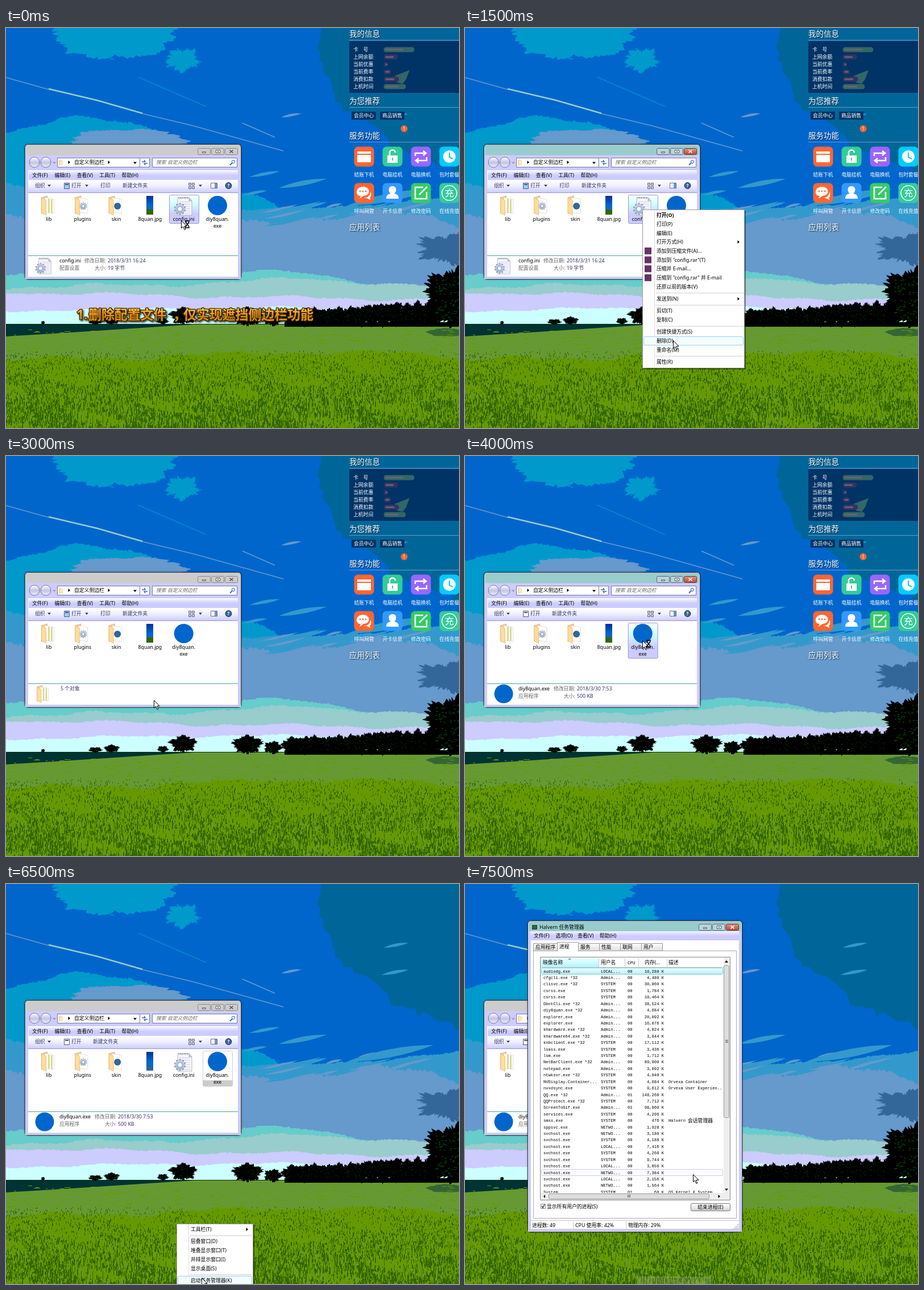
Recreate the animation shown at these times as an HTML page with a canvas. Size 797 by 703 pixels, loop 8 s.

```html
<!DOCTYPE html>
<html lang="zh">
<head>
<meta charset="utf-8">
<style>
html, body { margin: 0; width: 100%; height: 100%; overflow: hidden; }
canvas { display: block; }
</style>
</head>
<body>
<canvas id="stage" width="797" height="703"></canvas>
<script>
const W = 797, H = 703, LOOP = 8000, STEP = 500;
const UI = '"Noto Sans", "Noto Sans CJK SC", "Noto Sans CJK", sans-serif';
const MONO = '"Liberation Mono", "Noto Sans CJK SC", "Noto Sans CJK", monospace';
const screen = document.getElementById('stage').getContext('2d');
let c = screen;

let seed = 7;
const rnd = () => (seed = (seed * 16807) % 2147483647) / 2147483647;
const between = (a, b) => a + rnd() * (b - a);

// ---- drawing helpers ----
function rect(x, y, w, h, color) { c.fillStyle = color; c.fillRect(x, y, w, h); }
function box(x, y, w, h, fill, line, r = 0) {
  c.beginPath();
  c.roundRect(x + .5, y + .5, w - 1, h - 1, r);
  if (fill) { c.fillStyle = fill; c.fill(); }
  if (line) { c.strokeStyle = line; c.lineWidth = 1; c.stroke(); }
}
function fade(y0, y1, ...colors) {
  const g = c.createLinearGradient(0, y0, 0, y1);
  colors.forEach((col, i) => g.addColorStop(i / (colors.length - 1), col));
  return g;
}
function disc(x, y, r, fill, line) {
  c.beginPath();
  c.arc(x, y, r, 0, 7);
  if (fill) { c.fillStyle = fill; c.fill(); }
  if (line) { c.strokeStyle = line; c.lineWidth = 1; c.stroke(); }
}
function shape(d, fill, line, width = 1, x = 0, y = 0, s = 1) {
  const p = new Path2D(d);
  c.save();
  c.translate(x, y);
  c.scale(s, s);
  if (fill) { c.fillStyle = fill; c.fill(p); }
  if (line) { c.strokeStyle = line; c.lineWidth = width; c.stroke(p); }
  c.restore();
}
function text(s, x, y, color = '#000', size = 8.8, align = 'left', style = '', font = UI) {
  c.font = `${style} ${size}px ${font}`;
  c.textAlign = align;
  c.fillStyle = color;
  c.fillText(s, x, y + size * .36);
}
const center = (s, x, y, color, size, style) => text(s, x, y, color, size, 'center', style);
const down = (x, y, color = '#000') => shape('M-3-1.5H3L0 2Z', color, null, 1, x, y);
const right = (x, y, color = '#000') => shape('M-1.5-3V3L2 0Z', color, null, 1, x, y);

// ---- landscape ----
// Everything below a wavy edge through evenly spaced heights
function ridge(color, heights, wave) {
  const p = rnd() * 9, n = heights.length - 1;
  c.beginPath();
  c.moveTo(0, H);
  for (let x = 0; x <= W + 3; x += 3) {
    const u = Math.min(x / W * n, n - .001), i = u | 0;
    c.lineTo(x, heights[i] + (heights[i + 1] - heights[i]) * (u - i)
      + wave * (Math.sin(x / 47 + p) + .6 * Math.sin(x / 17 + 2 * p) + rnd() - .5));
  }
  c.lineTo(W, H);
  c.fillStyle = color;
  c.fill();
}
// Ellipse with a ragged outline
function puff(color, x, y, rx, ry, rag = .12) {
  const p = rnd() * 9;
  c.beginPath();
  for (let a = 0; a < 6.28; a += .04) {
    const r = 1 + rag * (Math.sin(a * 5 + p) * .5 + Math.sin(a * 13 + p) * .3 + rnd() - .5);
    c.lineTo(x + Math.cos(a) * rx * r, y + Math.sin(a) * ry * r);
  }
  c.fillStyle = color;
  c.fill();
}
function tree(x, ground, w, h) {
  puff('#000', x, ground - h * .54, w / 2, h * .46, .25);
  rect(x - 2, ground - h / 2, 4, h / 2, '#000');
  for (let i = 0; i < w / 2; i++)
    rect(x + between(-.38, .38) * w | 0, ground - h * between(.25, .85) | 0, 2, 1, '#003300');
}
function sky() {
  rect(0, 0, W, H, '#0066cc');
  puff('#006699', 800, 0, 245, 240, .06);
  puff('#0099cc', 190, 0, 112, 54);
  puff('#0099cc', 310, 56, 27, 19, .3);
  ridge('#0099cc', [182, 160, 164, 182, 285, 322, 316, 312, 300], 4);
  puff('#6699cc', 215, 198, 100, 20);
  ridge('#3399cc', [270, 320, 318, 297], 3);
  ridge('#6699cc', [328, 346, 358, 340, 320, 345], 6);
  for (let i = 0; i < 22; i++) {
    const x = between(415, 700), y = 335 - (x - 415) * .12 + between(-12, 22), len = between(25, 80);
    shape(`M0 0Q${len / 2} -9 ${len} ${-len * .22}Q${len / 2} 0 0 0Z`, i % 2 ? '#6699cc' : '#3399cc', null, 1, x, y);
  }
  [[428, 262, 54], [480, 281, 84], [416, 294, 44], [600, 312, 152], [660, 160, 48], [664, 112, 44], [484, 157, 36]]
    .forEach(([x, y, len]) => shape(`M0 0Q${len / 2} ${-len * .17 - 3} ${len} ${-len * .19}Q${len / 2} 0 0 0Z`,
      x < 490 && y < 200 ? '#6699cc' : '#3399cc', null, 1, x, y));
  puff('#336699', 780, 388, 52, 24, .3);
  ridge('#66cccc', [430, 428, 430, 470], 3);
  ridge('#99cccc', [455, 452, 440, 458], 3);
  ridge('#ccccff', [464, 470, 474, 478], 2.5);
  ridge('#ccffff', [497, 491, 496], 2);
  shape('M0 87L75 108M238 150L330 172L488 216M416 167L473 192', null, '#6699cc', 1.6);
  shape('M75 107L160 127L240 150', null, '#99cccc', 2.6);
  shape('M232 86L352 138M100 30L190 55', null, '#0099cc', 1.3);
}
function field() {
  rect(0, 521, W, H, '#669933');
  ridge('#669900', [584, 578, 568, 576], 4);
  shape('M0 520H345L100 536L0 542Z', '#003333');
  rect(0, 520, W, 1, '#003300');
  puff('#336633', 775, 535, 34, 7);
  for (let i = 0; i < 300; i++)
    rect(rnd() * W | 0, between(530, 575) | 0, between(3, 12) | 0, 1, '#669900');
  for (let i = 0; i < 9500; i++) {
    const q = Math.pow(rnd(), .7), x = rnd() * W | 0, y = 566 + q * 137 | 0;
    const clump = Math.sin(x / 70 + y / 13) + Math.sin(x / 31 - y / 9);
    if (clump > -1.1 || i % 3 == 0)
      rect(x, y, 1 + (rnd() < q * .4), between(2, 4 + q * 8) | 0, i % 9 ? '#336600' : '#669933');
  }
}
function trees() {
  [[157, 22, 9], [186, 25, 13], [276, 18, 11], [65, 6, 6], [312, 44, 29]].forEach(([x, w, h]) => tree(x, 521, w, h));
  tree(425, 524, 50, 32);
  tree(470, 524, 30, 22);
  for (let x = 504; x < 750; x += 20) tree(x, 525, between(30, 40), 25 + (x - 500) * .06 + rnd() * 6);
  rect(490, 517, W, 8, '#000');
  puff('#000', 800, 474, 62, 54, .25);
  for (let i = 0; i < 80; i++) rect(between(755, W) | 0, between(435, 515) | 0, 3, 2, '#003300');
}

// ---- side panel ----
const TILES = [
  ['#ff6633', '结账下机', '', 'M6 9H30V13H6ZM6 15H30V28H6Z'],
  ['#33cc99', '电脑挂机', 'M13 17V12A5 5 0 0 1 23 11', 'M9 16H27V29H9Z'],
  ['#9966ff', '电脑换机', 'M8 17V12H26M22 8L27 12L22 16M28 19V25H10M14 21L9 25L14 29', ''],
  ['#00ccff', '包时套餐', '', 'M18 7A11 11 0 1 0 18.1 7Z'],
  ['#ff6633', '呼叫网管', '', 'M16 7C2 7 2 24 12 23L10 28L17 23C30 23 30 7 16 7ZM29 16C32 21 30 25 28 26L29 30L23 27H18C25 26 29 22 29 16Z'],
  ['#3399ff', '开卡信息', '', 'M18 6C9 6 11 17 15 19C9 20 7 23 7 28H29C29 23 27 20 21 19C25 17 27 6 18 6Z'],
  ['#33cc66', '修改密码', 'M22 8H8V28H28V16M15 21L29 7', ''],
  ['#33cc99', '在线充值', 'M18 5A13 13 0 1 0 18.1 5Z', '']
];
function heading(s, y) {
  c.save();
  c.shadowColor = '#002244';
  c.shadowOffsetX = c.shadowOffsetY = 1;
  c.shadowBlur = 2;
  text(s, 604, y, '#fff', 13.5);
  c.restore();
  rect(604, y + 11, 193, 1, '#6699cc');
}
function sidePanel() {
  heading('我的信息', 10);
  rect(604, 23, 193, 91, '#003366');
  shape('M684 84L710 74L704 90L698 98L688 96Z', '#336666');
  ['卡　号', '上网余额', '当前优惠', '当前费率', '消费扣款', '上机时间'].forEach((s, i) => {
    const y = 38 + i * 13, w = [55, 26, 8, 14, 28, 40][i];
    text(s, 611, y, '#fff');
    box(664, y - 5, w, 10, i % 5 ? '#333366' : '#336666', null, 5);
    box(667, y - 2, w * .6, 4, '#666666', null, 2);
  });
  heading('为您推荐', 128);
  ['会员中心', '商品销售'].forEach((s, i) => {
    rect(608 + i * 50, 147, 43, 14, '#003366');
    center(s, 629.5 + i * 50, 154, '#fff');
  });
  disc(700.5, 177, 6, '#ff6633');
  center('1', 700.5, 177, '#fff', 8);
  heading('服务功能', 189);
  TILES.forEach(([color, label, line, fill], i) => {
    const x = 612 + i % 4 * 50, y = i < 4 ? 208 : 272;
    box(x, y, 36, 36, color, null, 7);
    if (line) shape(line, null, '#fff', i == 7 ? 1.5 : 2.6, x, y);
    if (fill) shape(fill, '#fff', null, 1, x, y);
    if (i == 1) rect(x + 17, y + 20, 2, 5, color);
    if (i == 3) shape('M18 11V19L24 22', null, color, 2, x, y);
    if (i == 4) [11, 16, 21].forEach(d => disc(x + d, y + 15, 1.4, color));
    if (i == 7) center('充', x + 18, y + 18, '#fff', 16);
    center(label, x + 18, y + 50, '#fff');
  });
  heading('应用列表', 350);
}

// ---- window parts ----
function frame(x, y, w, h, active) {
  c.save();
  c.shadowColor = 'rgba(0,0,0,.4)';
  c.shadowBlur = 3;
  box(x, y, w, h, '#ccccff', '#333', 5);
  c.restore();
  box(x + 1, y + 1, w - 2, 19, active ? '#99cccc' : '#cccccc', null, 4);
  shape(`M${x + 1.5} ${y + 6}V${y + h - 1.5}H${x + w - 1.5}V${y + 6}`, null, '#eeeeff');
}
function closeButton(x, y, w, h, active) {
  box(x, y, w, h, active ? fade(y, y + h, '#dd9988', '#bb4433') : '#cccccc', active ? '#663333' : '#888', 2);
  shape('M-3-2.5L3 2.5M3-2.5L-3 2.5', null, active ? '#fff' : '#555', 1.6, x + w / 2, y + h / 2);
}
function titleButtons(x, y, active) {
  [0, 24].forEach(d => box(x + d, y, 23, 12, active ? '#b8d4dc' : '#cccccc', active ? '#556677' : '#888', 2));
  box(x + 8, y + 6, 7, 3, '#fff', '#555');
  box(x + 32, y + 3, 8, 6, '#fff', '#555');
  rect(x + 35, y + 5, 2, 2, '#555');
  closeButton(x + 48, y, 23, 12, active);
}
function menuBar(names, x, y, w, gap) {
  rect(x, y, w, 16, fade(y, y + 16, '#f4f4ff', '#ccccff', '#ccccff'));
  names.forEach((s, i) => text(s, x + 6 + i * gap, y + 8));
}
function pushButton(s, x, y, w, h, line = '#777') {
  box(x, y, w, h, fade(y, y + h, '#fff', '#eee', '#ccc'), line, 2);
  center(s, x + w / 2, y + h / 2);
}
// Marks: * bold, # with icon, > submenu, empty string a divider
function menu(x, y, w, h, items, hot) {
  rect(x + 2, y + 2, w, h, 'rgba(0,0,0,.4)');
  box(x, y, w, h, '#fff', '#999');
  rect(x + 21, y + 2, 1, h - 4, '#ddd');
  let cy = y + 10;
  items.forEach((s, i) => {
    if (!s) { rect(x + 23, cy - 5, w - 25, 1, '#ccc'); cy += 5.6; return; }
    if (i == hot) box(x + 2, cy - 8, w - 4, 16, '#f3fcff', '#99ccff', 2);
    const [, bold, mark, name, arrow] = s.match(/^(\*?)(#?)(.*?)(>?)$/);
    if (mark) rect(x + 4, cy - 6, 12, 12, '#663366');
    text(name, x + 25, cy, '#000', 8.8, 'left', bold ? 'bold' : '');
    if (arrow) right(x + w - 11, cy);
    cy += 15.7;
  });
}
const FILE_MENU = ['*打开(O)', '打印(P)', '编辑(E)', '打开方式(H)>', '#添加到压缩文件(A)...',
  '#添加到 "config.rar"(T)', '#压缩并 E-mail...', '#压缩到 "config.rar" 并 E-mail', '还原以前的版本(V)', '',
  '发送到(N)>', '', '剪切(T)', '复制(C)', '', '创建快捷方式(S)', '删除(D)', '重命名(M)', '', '属性(R)'];
const BAR_MENU = ['工具栏(T)>', '', '层叠窗口(D)', '堆叠显示窗口(T)', '并排显示窗口(I)', '显示桌面(S)', '',
  '启动任务管理器(K)'];

// ---- file icons, drawn in a 32 unit square ----
function gear(x, y, r) {
  c.save();
  c.translate(x, y);
  for (let i = 0; i < 10; i++) {
    c.rotate(Math.PI / 5);
    rect(-r * .17, -r * 1.1, r * .34, r * .5, '#9999bb');
  }
  c.restore();
  disc(x, y, r * .9, fade(y - r, y + r, '#ccccee', '#99bbcc'));
  disc(x, y, r * .44, '#f4f8ff', '#8899bb');
}
function folder(x, y, s, inner) {
  shape('M4 3L14 0V29L4 31Z', '#ffcc99', '#cc9966', .6, x, y, s);
  shape('M10 3L26 6V31L10 29Z', '#fff', '#ccc', .6, x, y, s);
  if (inner == 'gear') gear(x + 18 * s, y + 18 * s, 6 * s);
  if (inner == 'disc') disc(x + 19 * s, y + 18 * s, 6 * s, '#336699');
  if (!inner) shape('M17 5V30M22 6V30', null, '#cccc66', 2, x, y, s);
  shape('M4 3L12 8V34L4 30Z', '#ffdd99', '#ddaa66', .6, x, y, s);
}
function iniFile(x, y, s) {
  shape('M6 2H26L31 8V33H6Z', '#f4f4ff', '#9999aa', .7, x, y, s);
  shape('M26 2V8H31Z', '#ccccdd', '#9999aa', .6, x, y, s);
  for (let i = 0; i < 6; i++) {
    rect(x + 9 * s, y + (9 + i * 4) * s, 19 * s, .8 * s, '#ccccdd');
    rect(x + (8 + i * 3) * s, y + s, s, 3 * s, '#777788');
  }
  gear(x + 10 * s, y + 22 * s, 9.5 * s);
}
const app = (x, y, r) => disc(x, y, r, '#0066cc');

// ---- file window ----
const INK = '#333366';
function toolbar(withPrint) {
  rect(39, 267, 369, 22, fade(267, 289, '#fff', '#eeeeff', '#ccccff'));
  rect(39, 289, 369, 1, '#9999cc');
  text('组织', 51, 277, INK);
  down(76, 277, INK);
  box(102, 272, 10, 11, withPrint ? '#99ccff' : '#fff', '#555577');
  rect(104, 274, 6, 2, '#555577');
  text('打开', 115, 277, INK);
  if (withPrint) {
    down(142, 277, INK);
    text('打印', 166, 277, INK);
  }
  text('新建文件夹', withPrint ? 205 : 153, 277, INK);
  for (let i = 0; i < 4; i++) box(321 + i % 2 * 6, 272 + (i >> 1) * 6, 5, 5, '#ccc', '#666699');
  down(342, 277, INK);
  box(360, 272, 12, 10, '#fff', '#666699');
  rect(367, 273, 4, 8, '#6699cc');
  disc(391.5, 277, 5.5, '#336699', INK);
  center('?', 391.5, 277, '#fff', 8, 'bold');
}
function details(name, kind, shift, date, size) {
  text(name, 94, 409);
  text(kind, 94, 422, '#666');
  text('修改日期:', 138 + shift, 409, '#666');
  text('大小:', 156 + shift, 422, '#666');
  text(date, 179 + shift, 409, INK);
  text(size, 179 + shift, 422, INK);
}
function explorer(active, withPrint, hasIni, selected) {
  frame(33, 204, 381, 238, active);
  titleButtons(337, 211, active);
  [50, 70].forEach(x => disc(x, 236, 9, fade(227, 246, '#fff', '#c4c4e4', '#f4f4ff'), '#777799'));
  down(85, 237, '#9999aa');
  [[90, 146], [235, 18], [257, 150]].forEach(([x, w]) => box(x, 228, w, 17, '#fff', '#777799'));
  folder(92, 231, .33);
  right(111, 236);
  text('自定义侧边栏', 120, 236);
  right(181, 236);
  down(227, 237);
  shape('M239 235H245L243 232M249 238H243L245 241', null, '#3366cc', 1.4);
  text('搜索 自定义侧边栏', 264, 236, '#666', 8.8, 'left', 'italic');
  disc(400, 235, 2.7, null, '#3366cc');
  shape('M398 237L394 241', null, '#3366cc', 1.8);
  rect(39, 250, 369, 187, '#fff');
  menuBar(['文件(F)', '编辑(E)', '查看(V)', '工具(T)', '帮助(H)'], 40, 251, 368, 39.4);
  toolbar(withPrint);

  const col = i => 75.5 + i * 59.3, exeX = col(hasIni ? 5 : 4);
  const glow = h => fade(293, 293 + h, '#fff', '#ccffff', '#ccccff', '#ccccff');
  if (selected == 'ini') box(287, 293, 53, 51, glow(51), '#9999cc', 2);
  if (selected == 'exe') box(exeX - 26, 293, 53, 63, glow(63), '#9999cc', 2);
  if (selected == 'faint') {
    box(exeX - 26, 293, 53, 63, '#fff', '#ccc', 2);
    rect(exeX - 25, 345, 51, 10, '#ccc');
  }
  [['lib'], ['plugins', 'gear'], ['skin', 'disc']].forEach(([name, inner], i) => {
    folder(col(i) - 17, 295, 1, inner);
    center(name, col(i), 336);
  });
  rect(247, 295, 12, 33, fade(295, 328, '#003399', '#0066cc', '#336699'));
  if (selected != 'faint') rect(247, 319, 12, 9, '#336600');
  center('8quan.jpg', col(3), 336);
  if (hasIni) {
    iniFile(296, 296, 1);
    center('config.ini', col(4), 336);
  }
  app(exeX, 312, 17);
  center('diy8quan.', exeX, 336);
  center('exe', exeX, 348);

  rect(39, 399, 369, 2, '#99cccc');
  if (selected == 'ini') {
    iniFile(52, 403, .88);
    details('config.ini', '配置设置', 0, '2018/3/31 16:24', '19 字节');
  } else if (selected) {
    app(68, 418, 16.5);
    details('diy8quan.exe', '应用程序', 18, '2018/3/30 7:53', '500 KB');
  } else {
    folder(51, 403, .9);
    text('5 个对象', 96, 409, INK);
  }
}

function deleteDialog(hot) {
  frame(39, 268, 354, 183, true);
  text('删除文件', 47, 281);
  closeButton(363, 275, 23, 12, true);
  rect(44, 290, 344, 155, '#fff');
  shape('M53 299H66L72 304V319H53Z', '#f8f8ff', '#aaa');
  shape('M53 311L62 318M61 310L54 318', null, '#cc6600', 1.8);
  text('确实要永久性地删除此文件吗?', 87, 305);
  iniFile(88, 323, 2.33);
  ['config.ini', '类型: 配置设置', '大小: 19 字节', '修改日期: 2018/3/31 16:24']
    .forEach((s, i) => text(s, 181, 326 + i * 12.3));
  pushButton('是(Y)', 241, 417, 63, 20, '#3399cc');
  box(242, 418, 61, 18, hot ? 'rgba(153,204,255,.35)' : null, '#99ccff', 1);
  pushButton('否(N)', 313, 417, 63, 20);
}

// ---- process list: name, account, memory, load, description ----
const PROCESSES = `audiodg.exe|L|10,288
cfgcli.exe *32|A|4,480
clisvc.exe *32|S|30,860
csrss.exe|S|1,784
csrss.exe|S|10,464
DbntCli.exe *32|A|38,524|06
diy8quan.exe *32|A|4,684
explorer.exe|A|20,092
explorer.exe|A|16,076
khardware.exe *32|A|4,824
khardware64.exe *32|A|3,844
knbclient.exe *32|S|17,112
lsass.exe|S|3,436
lsm.exe|S|1,712
NetBarClient.exe *32|A|89,900
notepad.exe|A|3,092
ntwksvr.exe *32|S|4,040
NVDisplay.Container...|S|4,684||Orvexa Container
nvxdsync.exe|S|9,612||Orvexa User Experien..
QQ.exe *32|A|148,268|01
QQProtect.exe *32|S|7,712
ScreenToGif.exe|A|98,960|01
services.exe|S|4,296
smss.exe|S|476||Halvern
sppsvc.exe|N|1,928
svchost.exe|N|3,180
svchost.exe|S|4,188
svchost.exe|L|7,416
svchost.exe|S|4,268
svchost.exe|S|9,744
svchost.exe|L|3,856
svchost.exe|N|7,384
svchost.exe|L|2,156
svchost.exe|N|1,564
System|S|60|01|OS Kernel & System`.split('\n').map(s => s.split('|'));
const ACCOUNTS = { L: 'LOCAL...', A: 'Admin...', S: 'SYSTEM', N: 'NETWO...' };

function processRows() {
  c.save();
  c.beginPath();
  c.rect(133, 147, 322, 396);
  c.clip();
  box(134, 147, 320, 12, fade(147, 159, '#f0ffff', '#bbeeff'), '#66cccc', 2);
  box(134, 501, 320, 12, '#fcfcff', '#ccccee', 2);
  PROCESSES.forEach(([name, who, mem, cpu, about], i) => {
    const y = 153 + i * 11.42;
    const cell = (s, x, align) => text(s, x, y, '#000', 7.15, align, '', MONO);
    cell(name, 138);
    cell(ACCOUNTS[who], 239);
    cell(cpu || '00', 286);
    cell(mem + ' K', 350, 'right');
    if (about) cell(about, 358);
    if (name == 'smss.exe') text('会话管理器', 392, y);
  });
  c.restore();
}
function scrollBars() {
  rect(455, 129, 11, 414, '#eee');
  box(455, 143, 10, 268, '#ddd', '#999', 2);
  rect(133, 543, 333, 12, '#eee');
  box(147, 544, 283, 10, '#ddd', '#999', 2);
  [-2, 0, 2].forEach(d => {
    rect(458, 276 + d, 5, 1, '#666');
    rect(288 + d, 546, 1, 5, '#666');
  });
  shape('M457 138H463L460 134ZM141 546V552L138 549Z', '#000');
  down(460, 537);
  right(447, 549);
}
function taskManager() {
  frame(110, 64, 378, 548, true);
  box(118, 72, 9, 8, '#336633', '#333');
  text('Halvern 任务管理器', 131, 76);
  titleButtons(411, 70, true);
  rect(116, 84, 366, 522, '#fff');
  menuBar(['文件(F)', '选项(O)', '查看(V)', '帮助(H)'], 115, 83, 367, 38.6);
  box(120, 117, 358, 471, '#fff', '#aaa');
  ['应用程序', '进程', '服务', '性能', '联网', '用户'].forEach((s, i) => {
    const x = i ? 125 + i * 37 : 120, on = i == 1;
    box(x, on ? 102 : 104, i ? 38 : 43, on ? 17 : 14, on ? '#fff' : fade(104, 118, '#fff', '#ddd'), '#999');
    if (on) rect(x + 1, 116, 36, 4, '#fff');
    text(s, x + 4, on ? 110 : 111);
  });
  box(132, 128, 335, 428, '#fff', '#888');
  rect(133, 129, 102, 17, fade(129, 146, '#f4ffff', '#ccffff', '#bbeeff'));
  rect(133, 146, 322, 1, '#ccc');
  [235, 281, 305, 355].forEach(x => rect(x, 130, 1, 16, '#ccc'));
  shape('M181 133H187L184 130Z', '#6699cc');
  [['映像名称', 137], ['用户名', 239], ['内存(...', 316], ['描述', 358]].forEach(([s, x]) => text(s, x, 138));
  text('CPU', 286, 138, '#000', 7.6, 'left', '', MONO);
  processRows();
  scrollBars();
  box(133, 562, 9, 9, '#fff', '#888');
  shape('M135 566L137 569L140 563', null, INK, 1.4);
  text('显示所有用户的进程(S)', 144, 567);
  pushButton('结束进程(E)', 397, 561, 70, 14);
  rect(116, 591, 366, 1, '#ccc');
  [['进程数: 49', 118], ['CPU 使用率: 42%', 194], ['物理内存: 29%', 287]].forEach(([s, x]) => {
    text(s, x, 600);
    rect(x - 4, 593, 1, 13, '#ccc');
  });
  for (let i = 0; i < 3; i++) for (let j = 0; j <= i; j++) rect(479 - j * 3, 598 + i * 3, 2, 2, '#bbb');
}

function caption(parts, y) {
  c.save();
  c.lineJoin = 'round';
  c.textAlign = 'left';
  c.font = `bold 22.9px ${UI}`;
  c.shadowColor = 'rgba(0,0,0,.8)';
  c.shadowBlur = 3;
  c.shadowOffsetX = c.shadowOffsetY = 2;
  c.strokeStyle = '#332200';
  c.lineWidth = 2.5;
  parts.forEach(([s, x]) => c.strokeText(s, x, y + 8.3));
  c.shadowColor = 'transparent';
  c.fillStyle = fade(y - 11, y + 11, '#ffcc33', '#ff9933', '#cc8800', '#ff9900');
  parts.forEach(([s, x]) => c.fillText(s, x, y + 8.3));
  c.restore();
}
const pointer = (x, y) => shape('M.5.5V14L3.5 11L6 16.5L8 15.5L5.7 10.3H10Z', '#fff', '#000', 1, x, y);
const hourglass = (x, y) =>
  shape('M0 0H8M0 12H8M1 1C1 5 7 7 7 11M7 1C7 5 1 7 1 11', '#fff', '#000', 1.5, x, y);

// Pointer jumps: half second at which it happens, x, y
const JUMPS = [[0, 308, 338], [1, 312, 319], [2, 316, 321], [3, 366, 549], [4, 266, 345], [5, 260, 429],
  [7, 312, 324], [13, 344, 692], [15, 401, 510]];

const scene = document.createElement('canvas');
scene.width = W;
scene.height = H;
c = scene.getContext('2d');
sky();
field();
trees();
c = screen;

function draw(k) {
  const during = (a, b) => k >= a && k <= b;
  c.drawImage(scene, 0, 0);
  if (k < 9) sidePanel();
  explorer(during(1, 3) || during(7, 8), k < 7, !during(6, 12),
    k < 6 ? 'ini' : k == 6 ? '' : k < 13 ? 'exe' : 'faint');
  if (k == 0) caption([['1.', 124], ['删除配置文件', 145], ['，', 294], ['仅实现遮挡侧边栏功能', 312]], 504);
  if (during(1, 3)) menu(312, 319, 180, 279, FILE_MENU, [-1, 0, 16][k - 1]);
  if (during(4, 5)) deleteDialog(k == 5);
  if (during(9, 12)) caption([['2.', 368], ['侧边栏已被遮挡', 389]], 77);
  if (k == 13) menu(300, 597, 135, 114, BAR_MENU, 7);
  if (k > 13) {
    c.globalAlpha = k == 14 ? .6 : .22;
    box(302, 690, 132, 16, '#ccc', '#99ccff', 2);
    text('启动任务管理器(K)', 325, 697);
    c.globalAlpha = 1;
  }
  if (k == 15) taskManager();
  const [, x, y] = JUMPS.filter(j => j[0] <= k).pop();
  pointer(x, y);
  if (k == 0 || k == 8) hourglass(x + 7, y + k % 8 + (k ? 0 : 1));
}

let shown = -1;
function tick() {
  const k = Math.floor(performance.now() % LOOP / STEP);
  if (k != shown) draw(shown = k);
  requestAnimationFrame(tick);
}
tick();
</script>
</body>
</html>
```
